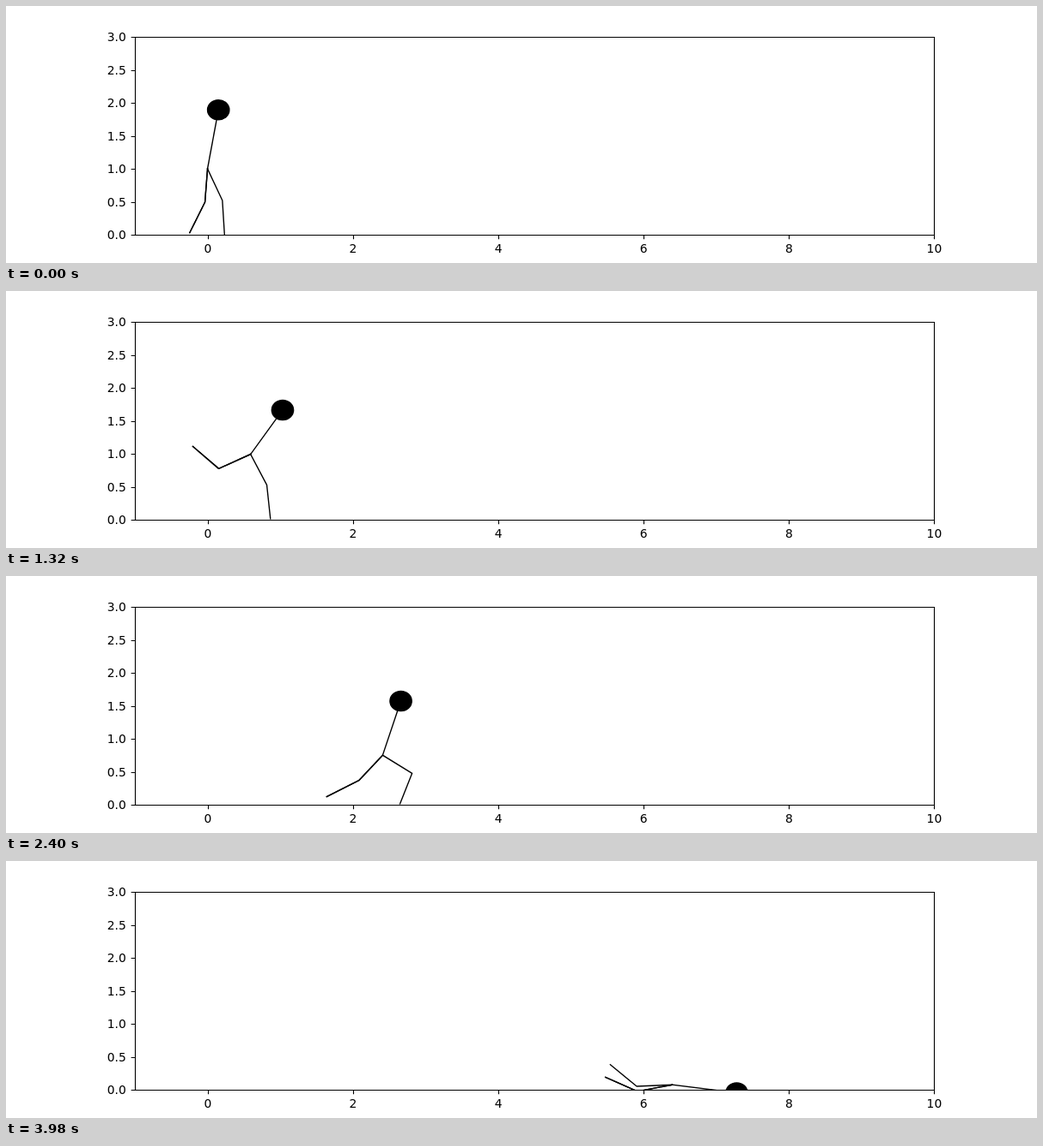
Write an HTML page that moves like this. It is 1200 px wide and 300 px high and loops after 4000 ms.

```html
<!DOCTYPE html>
<html lang="en">
<head>
<meta charset="utf-8">
<title>Stick figure walk</title>
<style>
  html, body { margin: 0; width: 100%; height: 100%; overflow: hidden; background: #fff; }
  svg { display: block; width: 100vw; height: 100vh; }
  text { font: 13.89px "DejaVu Sans", sans-serif; }
  .axes { fill: none; stroke: #000; stroke-width: 1.11; }
  .body { fill: none; stroke: #000; stroke-width: 1.39; stroke-linejoin: round; stroke-linecap: square; }
</style>
</head>
<body>
<svg viewBox="0 0 1200 300">
  <clipPath id="plot"><rect x="150" y="36" width="930" height="231"/></clipPath>
  <rect width="1200" height="300" fill="#fff"/>
  <g class="body" clip-path="url(#plot)">
    <ellipse id="head" rx="12.68" ry="11.55" fill="#000"/>
    <path id="torso"/>
    <path id="legA"/>
    <path id="legA2"/>
    <path id="legB"/>
  </g>
  <path id="axes" class="axes"/>
  <g id="labels"></g>
</svg>
<script>
const LOOP = 4000, STEP = 20;
const LEG = .98, MIN_BOW = .09, MAX_BOW = .32;
const $ = id => document.getElementById(id);
const px = x => 150 + (x + 1) * 930 / 11;
const py = y => 267 - y * 77;

// Key poses: time, hip x, hip y, head x, head y
const trunk = [
  [0, 0, 1, .15, 1.893], [900, .033, .593, .708, 1.034],
  [1080, .22, .68, 1.117, .8], [1320, .593, .993, 1.034, 1.663],
  [1480, .83, 1.14, 1.14, 2.02], [1960, 1.548, .724, 1.707, 1.579],
  [2840, 3.4, .778, 3.855, 1.565], [3460, 5.003, .646, 5.694, 1.243],
  [3980, 6.398, .075, 7.285, -.046]
];
// Foot plants and swings: time, x, y
const footA = [
  [0, -.245, .03], [900, -.27, -.2], [1100, -.79, .6], [1320, -.202, 1.11],
  [1760, .875, .035], [1960, .875, .035], [2840, 3.139, .21],
  [3100, 4.355, 0], [3460, 4.355, 0], [3980, 5.478, .19]
];
const footB = [
  [0, .234, 0], [740, -.98, .6], [900, -.783, .828], [1180, .866, .015],
  [1640, .866, .015], [1960, 1.637, .125], [2300, 2.65, .015],
  [2840, 2.65, .015], [3460, 4.255, .38], [3980, 5.545, .38]
];

// Monotone cubic interpolation through the rows of a track
function sample(track, t) {
  let i = 0;
  while (i < track.length - 2 && track[i + 1][0] <= t) i++;
  const rate = (k, c) => (track[k + 1][c] - track[k][c]) / (track[k + 1][0] - track[k][0]);
  const slope = (k, c) => {
    if (k === 0) return rate(0, c);
    if (k === track.length - 1) return rate(k - 1, c);
    const a = rate(k - 1, c), b = rate(k, c);
    return a * b <= 0 ? 0 : 2 * a * b / (a + b);
  };
  const [p, q] = [track[i], track[i + 1]];
  const span = q[0] - p[0], u = (t - p[0]) / span, v = 1 - u;
  return p.slice(1).map((from, n) => {
    const c = n + 1;
    return from * v * v * (1 + 2 * u) + q[c] * u * u * (3 - 2 * u)
      + span * u * v * (slope(i, c) * v - slope(i + 1, c) * u);
  });
}

const line = points => "M" + points.map(([x, y]) => px(x).toFixed(2) + " " + py(y).toFixed(2)).join("L");

// The knee bows forward by as much as the leg is shortened
function leg([hx, hy], [fx, fy]) {
  const dx = fx - hx, dy = fy - hy, d = Math.hypot(dx, dy);
  const slack = Math.sqrt(Math.max(0, LEG * LEG - d * d)) / 2;
  const bow = Math.min(MAX_BOW, Math.max(MIN_BOW, slack)) / d;
  const knee = [hx + dx / 2 - dy * bow, hy + dy / 2 + dx * bow];
  return line([[hx, hy], knee, [fx, fy]]);
}

function draw(time) {
  const t = Math.floor(time % LOOP / STEP) * STEP;
  const [hx, hy, x, y] = sample(trunk, t);
  const hip = [hx, hy];
  const legA = leg(hip, sample(footA, t));
  $("head").setAttribute("cx", px(x));
  $("head").setAttribute("cy", py(y));
  $("torso").setAttribute("d", line([hip, [x, y]]));
  $("legA").setAttribute("d", legA);
  $("legA2").setAttribute("d", legA);
  $("legB").setAttribute("d", leg(hip, sample(footB, t)));
}

function buildAxes() {
  const snap = v => Math.floor(v + .5) + .5;
  let d = "M150.5 36.5H1080.5V267.5H150.5Z", labels = "";
  const label = (x, y, anchor, s) => {
    labels += `<text x="${x}" y="${y}" text-anchor="${anchor}">${s}</text>`;
  };
  for (let x = 0; x <= 10; x += 2) {
    d += `M${snap(px(x))} 267.5v4.86`;
    label(px(x) + .4, 288, "middle", x);
  }
  for (let y = 0; y <= 3; y += .5) {
    d += `M150.5 ${snap(py(y))}h-4.86`;
    label(139.8, snap(py(y)) + 4.5, "end", y.toFixed(1));
  }
  $("axes").setAttribute("d", d);
  $("labels").innerHTML = labels;
}

buildAxes();
const start = performance.now();
function tick() {
  draw(performance.now() - start);
  requestAnimationFrame(tick);
}
tick();
</script>
</body>
</html>
```
